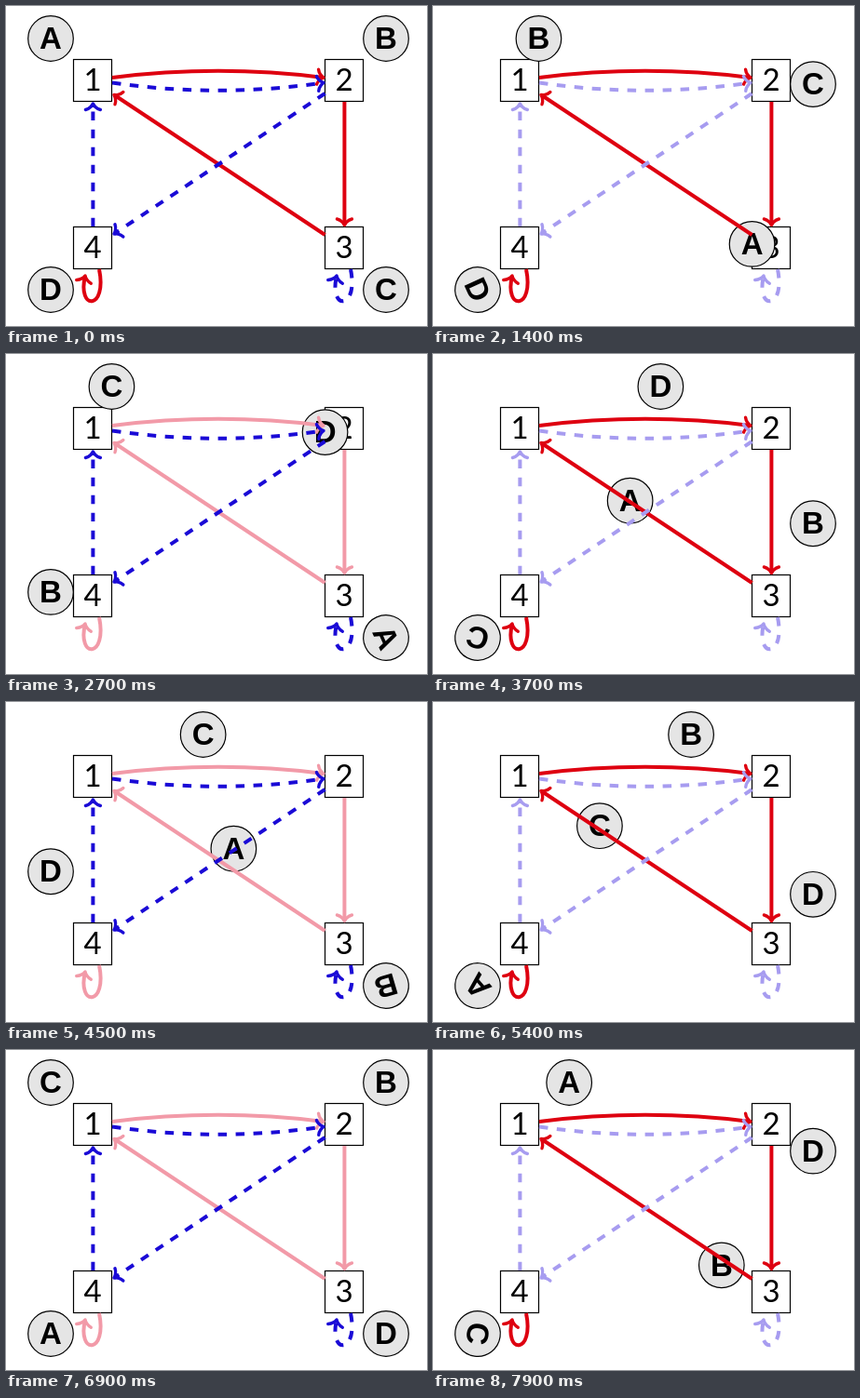
An HTML page with a canvas for the animation above (8000 ms loop, 452x344 px).

```html
<!DOCTYPE html>
<html lang="en">
<head>
<meta charset="utf-8">
<title>Two permutations acting on four tokens</title>
<style>
  html, body { margin: 0; width: 100%; height: 100%; overflow: hidden; background: #fff; }
  canvas { display: block; }
</style>
</head>
<body>
<canvas id="stage" width="452" height="344"></canvas>
<script>
const ctx = document.getElementById('stage').getContext('2d');

const LOOP = 8000, TICK = 100;
const STEP = 13;   // units per step: one rest, then twelve poses
const word = 'brbrbrbbrbbrrbbbrbr';
const moves = { r: [1, 2, 0, 3], b: [1, 3, 2, 0] };
const pace = [[0, 0], [14, 42], [27, 81], [37, 111], [54, 164], [69, 207], [79, 238]];

const boxes = [[93, 80], [363, 80], [363, 260], [93, 260]];
const seats = [[48, 35], [408, 35], [408, 305], [48, 305]];
const colors = { r: ['#de0010', '#f29aa8'], b: ['#1a0ad6', '#a79cf0'] };

// Each edge: start, two control points, end.
const line = (x, y, u, v) => [x, y, x, y, x, y, u, v];
const loop = x => [x + 7, 283, x + 16, 327, x - 17, 328, x - 8, 290];
const edges = {
  r: [
    [114, 77, 190, 67.5, 266, 67.5, 341, 77],
    line(363.4, 103, 363.4, 235.5),
    line(342.5, 246, 116, 95.5),
    loop(93)
  ],
  b: [
    [114, 82.5, 190, 93.5, 266, 93.5, 341, 82.5],
    line(342.5, 94, 116, 245),
    line(93.4, 237, 93.4, 105),
    loop(363)
  ]
};

// Seat of every token at the start of each step.
const seatings = [[0, 1, 2, 3]];
for (const k of word) seatings.push(seatings.at(-1).map(p => moves[k][p]));

function unitAt(tick) {
  const i = Math.max(1, pace.findIndex(p => p[0] >= tick));
  const [t0, u0] = pace[i - 1], [t1, u1] = pace[i];
  return Math.round(u0 + (u1 - u0) * (tick - t0) / (t1 - t0));
}

function drawBox([x, y], i) {
  ctx.fillStyle = '#fff';
  ctx.fillRect(x - 20.5, y - 22.5, 41, 45);
  ctx.strokeRect(x - 20.5, y - 22.5, 41, 45);
  ctx.fillStyle = '#000';
  ctx.font = '33px Lato, sans-serif';
  ctx.fillText(i + 1, x, y + 11.3);
}

function drawToken(name, from, to, part) {
  const [x0, y0] = seats[from], [x1, y1] = seats[to];
  ctx.save();
  ctx.translate(x0 + (x1 - x0) * part, y0 + (y1 - y0) * part);
  if (from === to) ctx.rotate(2 * Math.PI * part);
  ctx.beginPath();
  ctx.arc(0, 0, 24.3, 0, 7);
  ctx.fillStyle = '#e5e5e5';
  ctx.fill();
  ctx.stroke();
  ctx.fillStyle = '#000';
  ctx.font = 'bold 33px "Liberation Sans", Arial, sans-serif';
  ctx.fillText(name, 0, 11.2);
  ctx.restore();
}

function drawEdge(e, color, dash) {
  const [x, y, a, b, c, d, u, v] = e;
  ctx.save();
  ctx.strokeStyle = color;
  ctx.lineWidth = 4;
  ctx.setLineDash(dash);
  ctx.beginPath();
  ctx.moveTo(x, y);
  ctx.bezierCurveTo(a, b, c, d, u, v);
  ctx.stroke();

  ctx.setLineDash([]);
  ctx.lineWidth = 3.4;
  ctx.lineCap = ctx.lineJoin = 'round';
  ctx.translate(u, v);
  ctx.rotate(Math.atan2(v - d, u - c));
  ctx.beginPath();
  ctx.moveTo(-6.5, -8);
  ctx.bezierCurveTo(-5.5, -3.5, -1.5, -0.6, 0, 0);
  ctx.bezierCurveTo(-1.5, 0.6, -5.5, 3.5, -6.5, 8);
  ctx.stroke();
  ctx.restore();
}

function draw(time) {
  const unit = unitAt(Math.floor(time % LOOP / TICK));
  const step = Math.floor(unit / STEP), phase = unit % STEP;
  const part = Math.max(0, phase - 1) / 11;
  const active = word[step];

  ctx.fillStyle = '#fff';
  ctx.fillRect(0, 0, 452, 344);
  ctx.strokeStyle = '#000';
  ctx.lineWidth = 1.2;
  ctx.textAlign = 'center';
  boxes.forEach(drawBox);
  seatings[step].forEach((p, i) => drawToken('ABCD'[i], p, moves[active][p], part));
  for (const k of ['r', 'b']) {
    const faded = phase > 0 && k !== active;
    for (const e of edges[k]) drawEdge(e, colors[k][+faded], k === 'b' ? [9.5, 9.5] : []);
  }
}

const start = performance.now();
function frame() {
  draw(performance.now() - start);
  requestAnimationFrame(frame);
}
frame();
</script>
</body>
</html>
```
